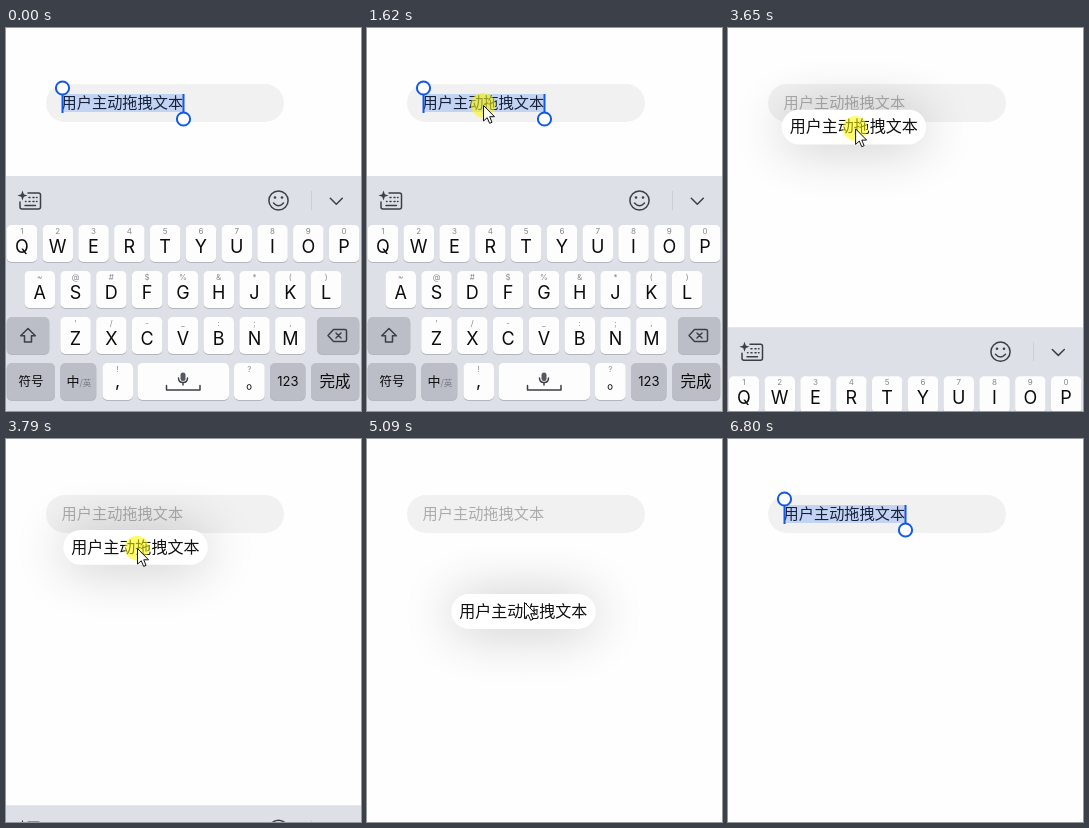
An HTML page that plays this animation: 355 px wide and 383 px high, repeating every 7.93 s.

```html
<!DOCTYPE html>
<html lang="zh-CN">
<head>
<meta charset="utf-8">
<style>
  html, body { margin: 0; width: 100%; height: 100%; overflow: hidden; background: #fefefe; }
  svg { display: block; width: 355px; height: 383px; }
  text { font-family: "Noto Sans CJK SC", "Noto Sans CJK", "Noto Sans", sans-serif; }
  .phrase { font-size: 15.2px; }
  .letter { font: 400 18px Inter, sans-serif; text-anchor: middle; fill: #0c0c0c; }
  .hint { font: 8px Inter, sans-serif; text-anchor: middle; fill: #85888e; }
  .label { font-size: 13px; text-anchor: middle; fill: #0c0c0c; }
  .line { fill: none; stroke: #3c3f45; stroke-width: 1.5; stroke-linecap: round; stroke-linejoin: round; }
</style>
</head>
<body>
<svg viewBox="0 0 355 383">
  <defs>
    <filter id="soft" x="-100%" y="-400%" width="300%" height="900%">
      <feGaussianBlur stdDeviation="25"/>
    </filter>
  </defs>

  <rect x="40" y="56" width="238" height="38" rx="19" fill="#f1f1f1"/>
  <rect id="range" x="56" y="66" width="122" height="18" fill="#c3d3f3"/>
  <text id="fieldText" class="phrase" x="55.6" y="79.7">用户主动拖拽文本</text>
  <g id="handles" stroke="#1259e3" stroke-width="2" fill="#fff">
    <path d="M56.5 66V85M177.5 66V85"/>
    <circle cx="56.5" cy="60" r="6.6"/>
    <circle cx="177.5" cy="91" r="6.6"/>
  </g>

  <g id="pill">
    <rect id="shadow" x="-69" y="-15" width="138" height="34" rx="17" filter="url(#soft)"/>
    <rect id="plate" fill="#fff"/>
    <text class="phrase" x="-60.9" y="5" fill="#111">用户主动拖拽文本</text>
  </g>

  <g id="keyboard">
    <rect y="148" width="355" height="236" fill="#dde0e7"/>
    <g id="keys"></g>
    <g class="line">
      <path d="M22 165H32.5Q34.5 165 34.5 167V179Q34.5 181 32.5 181H16Q14 181 14 179V174"/>
      <path d="M19 177.5H29.5"/>
      <path d="M23 169.5H24M27 169.5H28M30.5 169.5H31M19.5 173.5H20M23 173.5H24M27 173.5H28M30.5 173.5H31"/>
      <circle cx="272.5" cy="172.5" r="9.6"/>
      <path d="M267.5 175Q272.5 180.5 277.5 175"/>
      <path d="M324.3 170.3L330.3 176.2L336.3 170.3"/>
      <path d="M22 300.5L29.3 307.8H25.5V314H18.5V307.8H14.7Z"/>
      <path d="M327.5 301.5H339Q340.5 301.5 340.5 303V312Q340.5 313.5 339 313.5H327.5L322 307.5ZM330 305L335 310M335 305L330 310"/>
      <path d="M160.5 357.5V362H194V357.5M172.5 350Q172.5 354.5 177 354.5T181.5 350M177 354.5V357"/>
    </g>
    <path d="M16.5 162.5L17.8 166.2L21.5 167.5L17.8 168.8L16.5 172.5L15.2 168.8L11.5 167.5L15.2 166.2Z" fill="#3c3f45"/>
    <circle cx="269" cy="169.5" r="1.3" fill="#3c3f45"/>
    <circle cx="276" cy="169.5" r="1.3" fill="#3c3f45"/>
    <rect x="174.5" y="344.5" width="5" height="8.5" rx="2.5" fill="#55585e"/>
    <path d="M305.5 163V182" stroke="#cbced5"/>
  </g>

  <g id="pointer">
    <circle id="press" r="12.3" fill="#fcf800" fill-opacity=".56"/>
    <path d="M.5 .5V16L4.2 12.7L6.6 18.3L9 17.3L6.7 11.7H11.5Z" fill="#fff" stroke="#111"/>
  </g>
</svg>

<script>
const $ = id => document.getElementById(id);
const LOOP = 7930;

function buildKeys() {
  let out = '';
  const key = (x, y, w, fill = '#fdfdfe') => {
    out += `<rect x="${x}" y="${y + 1}" width="${w}" height="37" rx="5" fill="#b3b6be"/>` +
           `<rect x="${x}" y="${y}" width="${w}" height="37" rx="5" fill="${fill}"/>`;
  };
  const text = (kind, x, y, s, style = '') => {
    out += `<text class="${kind}" x="${x}" y="${y}" style="${style}">${s}</text>`;
  };
  const grey = '#bbbec6';
  const rows = [
    [0.7, 197, 'QWERTYUIOP', '1234567890'],
    [18.5, 243, 'ASDFGHJKL', '~@#$%&*()'],
    [54.3, 289, 'ZXCVBNM', "'/-_:;,"],
  ];
  for (const [x0, y, letters, hints] of rows) {
    [...letters].forEach((letter, i) => {
      const x = x0 + i * 35.8;
      key(x, y, 30.5);
      text('hint', x + 15.2, y + 9, hints[i].replace('&', '&amp;'));
      text('letter', x + 15.2, y + 27.5, letter);
    });
  }
  key(0.7, 289, 42.6, grey);
  key(311, 289, 42.3, grey);
  key(0.7, 335, 48.3, grey);
  key(54.3, 335, 36, grey);
  key(96.5, 335, 30.5);
  key(131.5, 335, 91.5);
  key(228, 335, 30.7);
  key(264, 335, 35.5, grey);
  key(305, 335, 48.3, grey);
  text('label', 25, 358, '符号', 'font-size:12.5px');
  text('label', 67, 357.5, '中', 'font-size:13px');
  text('label', 79.3, 357.5, '/英', 'font-size:8.5px;fill:#777a80');
  text('hint', 111.5, 343.5, '!');
  text('letter', 111.5, 359, ',');
  text('hint', 243.3, 343.5, '?');
  text('label', 240, 359.5, '。', 'font-size:16px;text-anchor:start');
  text('letter', 281.8, 358, '123', 'font-size:13px');
  text('label', 329, 359, '完成', 'font-size:15.5px');
  $('keys').innerHTML = out;
}

// Each row: time, x, y
const pointerPath = [
  [190, 322, 341], [400, 203, 172], [540, 140, 96], [610, 129, 83], [810, 128, 83],
  [1550, 116, 77], [3220, 116, 77], [3290, 117, 78], [3790, 131, 109], [4060, 142, 133],
  [4340, 153, 157], [4610, 153, 157], [4820, 157, 163], [5820, 157, 163], [6100, 196, 212],
  [6400, 282, 320], [6660, 318, 367], [6800, 331, 383],
];
const pillPath = [
  [3290, 116.5, 75], [3790, 129.5, 108.3], [4060, 139.5, 136.5], [4340, 148, 160.3],
  [4480, 154.5, 166.5], [4680, 154.5, 166.5], [4820, 156.5, 172.5],
];

function along(path, t) {
  const i = path.findIndex(p => p[0] > t);
  if (i === 0) return path[0].slice(1);
  if (i < 0) return path[path.length - 1].slice(1);
  const [a, b] = [path[i - 1], path[i]];
  const k = (t - a[0]) / (b[0] - a[0]);
  return [a[1] + (b[1] - a[1]) * k, a[2] + (b[2] - a[2]) * k];
}
const progress = (t, from, to) => Math.min(1, Math.max(0, (t - from) / (to - from)));
const smooth = k => k * k * (3 - 2 * k);
const set = (id, attrs) => {
  for (const name in attrs) $(id).setAttribute(name, attrs[name]);
};
const show = (id, on) => set(id, { visibility: on ? 'visible' : 'hidden' });

function draw(t) {
  const selected = t < 2550 || t >= 5160;
  show('range', selected);
  show('handles', selected);
  set('fieldText', { fill: selected ? '#182039' : '#acacac' });

  const [px, py] = along(pillPath, t);
  const scale = 1 + 0.055 * smooth(progress(t, 3290, 3500));
  const pad = 8 * progress(t, 2480, 2760);
  set('pill', {
    transform: `translate(${px} ${py}) scale(${scale})`,
    opacity: 1 - progress(t, 5100, 5230),
    display: t >= 2550 && t < 5230 ? 'inline' : 'none',
  });
  set('plate', {
    x: -60.5 - pad, y: -8.5 - pad, width: 121 + 2 * pad, height: 17 + 2 * pad, rx: 8.5 + pad,
  });
  set('shadow', { opacity: t < 3290 ? 0.05 * progress(t, 2550, 2760) : 0.23 });

  const hide = smooth(progress(t, 3300, 3890));
  set('keyboard', { transform: `translate(0 ${236 * hide})` });

  const [mx, my] = along(pointerPath, t);
  set('pointer', { transform: `translate(${mx} ${my})` });
  show('pointer', t >= 190 && t < 6800);
  set('press', { display: t >= 1620 && t < 5020 ? 'inline' : 'none' });
}

buildKeys();
const start = performance.now();
function tick() {
  draw((performance.now() - start) % LOOP);
  requestAnimationFrame(tick);
}
tick();
</script>
</body>
</html>
```
